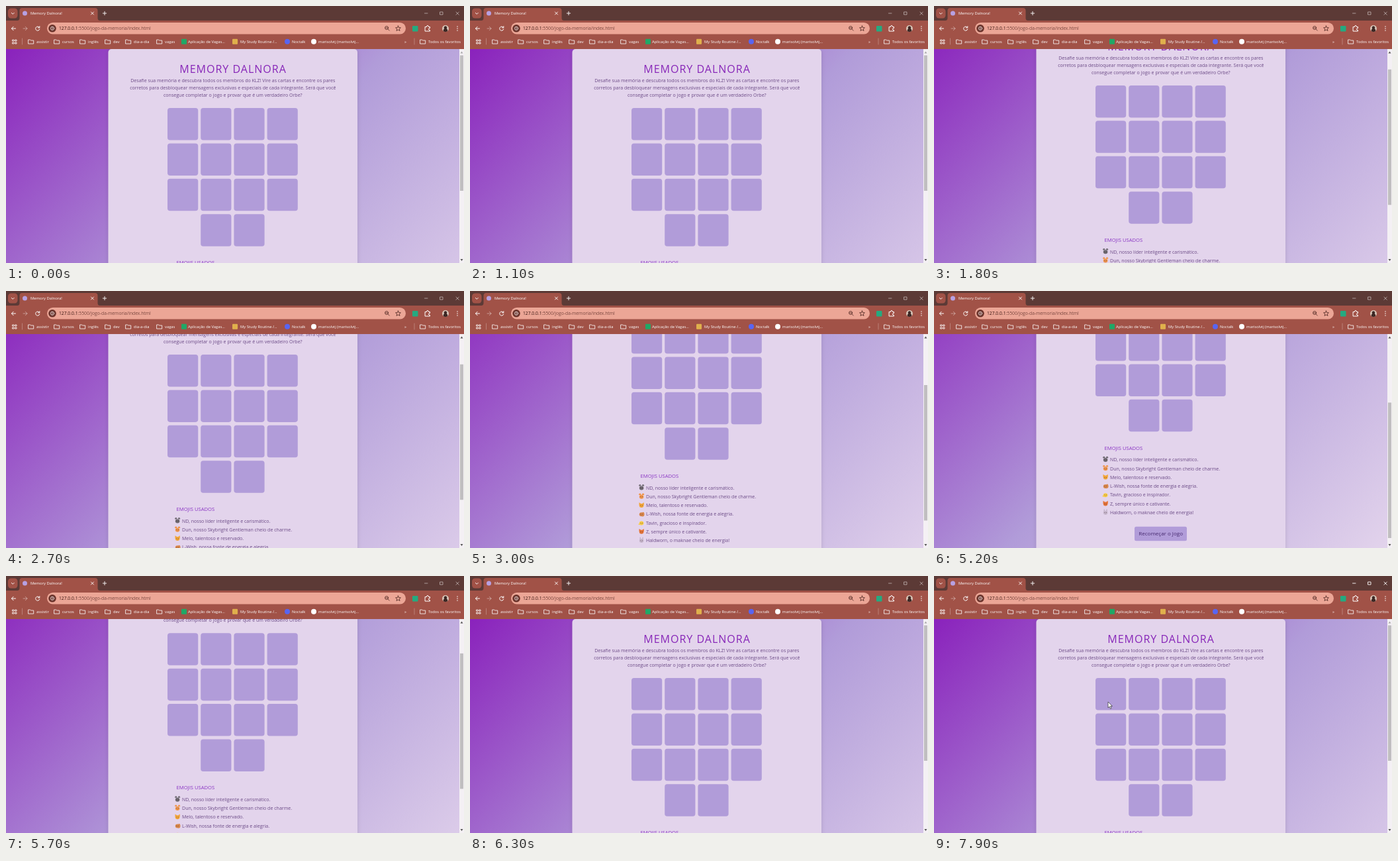
An HTML page that plays this animation: 692 px wide and 388 px high, repeating every 8000 ms.

```html
<!DOCTYPE html>
<html lang="pt-BR">
<head>
<meta charset="utf-8">
<title>Memory Dalnora!</title>
<style>
  html, body { margin: 0; width: 100%; height: 100%; overflow: hidden; }
  svg { display: block; width: 692px; height: 388px; font: 7.05px "Open Sans", "Noto Sans", sans-serif; }
  .mid { text-anchor: middle; }
  .copy { fill: #6b4a86; }
  .bar { font-size: 5.8px; fill: #fff; }
  .line { fill: none; stroke: #fff; stroke-linecap: round; stroke-linejoin: round; }
  .dark { stroke: #4a241f; }
</style>
</head>
<body>
<svg viewBox="0 0 692 388">
  <defs>
    <linearGradient id="sky" gradientUnits="userSpaceOnUse" x1="50.9" y1="-50.9" x2="634.1" y2="532.4">
      <stop offset="0" stop-color="#8a22bc"/>
      <stop offset=".5" stop-color="#b19cd9"/>
      <stop offset="1" stop-color="#e3d4ec"/>
    </linearGradient>
    <filter id="shadow" x="-5%" width="110%"><feDropShadow dx="0" dy="1" stdDeviation="3" flood-opacity=".13"/></filter>
  </defs>

  <g id="page">
    <rect width="692" height="482" fill="url(#sky)"/>
    <rect x="154.5" width="376.5" height="481.5" rx="5" fill="#e3d4ec" filter="url(#shadow)"/>
    <text class="mid" x="343" y="36.3" font-size="16" letter-spacing="1" fill="#8726b8">MEMORY DALNORA</text>
    <g class="mid copy">
      <text x="342.8" y="50.3">Desafie sua memória e descubra todos os membros do KLZ! Vire as cartas e encontre os pares</text>
      <text x="342.8" y="61">corretos para desbloquear mensagens exclusivas e especiais de cada integrante. Será que você</text>
      <text x="342.8" y="71.7">consegue completar o jogo e provar que é um verdadeiro Orbe?</text>
    </g>
    <g id="cards" fill="#b19cd9"></g>
    <text x="257.5" y="325.1" font-size="7.65" font-weight="500" fill="#8a35c4">EMOJIS USADOS</text>
    <g id="list" class="copy"></g>
    <rect x="303" y="441" width="79" height="21.5" rx="2.5" fill="#b19cd9"/>
    <text class="mid" x="342.7" y="454.6" font-size="8" fill="#472a70">Recomeçar o Jogo</text>
  </g>

  <rect x="685" y="65" width="7" height="323" fill="#f4f0f4"/>
  <rect id="thumb" x="686" y="74.5" width="5" height="204.5" fill="#c0bec0"/>
  <path id="up" d="M686.5 71.5l2-3 2 3z"/>
  <path id="down" d="M686.5 382l2 3 2-3z"/>

  <rect width="692" height="23" fill="#5c3a36"/>
  <rect y="22" width="692" height="43" fill="#a15247"/>
  <rect x="3" y="3.5" width="14.5" height="15" rx="4.5" fill="#a15247"/>
  <path d="M17 22q3.500 0 3.500-4V7q0-4 4-4h110q4 0 4 4v11q0 4 3.500 4z" fill="#a15247"/>
  <circle cx="28.500" cy="11" r="3.500" fill="#b7a0e2"/>
  <text x="37" y="13.300" font-size="5.900" fill="#fff">Memory Dalnora!</text>
  <path class="line" stroke-width=".9" d="M8.300 10.300l2 2 2-2M128.500 9l4 4m0-4l-4 4M146.300 11h5.400m-2.700-2.700v5.400"/>
  <path id="controls" class="line" stroke-width=".9" d="M632.500 11h4.500M656 9h4v4h-4zM680 9l4.300 4.300m0-4.300l-4.300 4.300"/>

  <path class="line" d="M14.500 34H8.500m2.700-2.800L8.500 34l2.700 2.800M50.300 32.200a3.100 3.100 0 1 0 .5 2.800m0-4.300v2.200h-2.300"/>
  <path class="line" opacity=".4" d="M26 34h6m-2.700-2.800L32 34l-2.700 2.800"/>
  <rect x="62" y="25" width="542" height="17.500" rx="8.750" fill="#eca696"/>
  <circle cx="70" cy="33.800" r="5.800" fill="#6b342c"/>
  <circle class="line" cx="70" cy="33.800" r="2.600" stroke-width=".7"/>
  <path class="line" stroke-width=".7" d="M70 33.500v1.600m0-2.800v.1"/>
  <text x="80" y="36.300" font-size="6.750" fill="#7b4840"><tspan fill="#35130f">127.0.0.1</tspan>:5500/jogo-da-memoria/index.html</text>
  <path class="line dark" stroke-width=".8" d="M577 34.800l2.300 2.300M573.700 33h2.800"/>
  <circle class="line dark" cx="575.100" cy="33" r="2.500" stroke-width=".8"/>
  <path class="line dark" stroke-width=".8" d="M592.500 30l1.100 2.600 2.800.2-2.100 1.800.7 2.800-2.500-1.500-2.500 1.500.7-2.800-2.100-1.800 2.800-.2z"/>
  <rect x="614" y="30" width="8.500" height="8.500" rx="1" fill="#25aa80"/>
  <path class="line" d="M633.500 31.500h2q0-2 1.500-2t1.500 2h2v2q-2 0-2 1.500t2 1.500v1.500h-7z"/>
  <circle cx="664" cy="34" r="5" fill="#d8c5b7"/>
  <path d="M660.700 37.700q0-3 1.500-3.500a2.300 2.300 0 1 1 3.600 0q1.500.5 1.500 3.500-3.300 2.600-6.600 0z" fill="#3c2724"/>
  <path class="line" stroke-width="1.500" d="M682 31v.01M682 34v.01M682 37v.01"/>

  <g id="bookmarks" class="bar"></g>
  <path class="line" stroke-width=".8" d="M10 51h2v2h-2zm4 0h2v2h-2zm-4 4h2v2h-2zm4 0h2v2h-2z"/>
  <path class="line" stroke-width=".6" opacity=".45" d="M24.500 49v9M617 49v9"/>
  <text class="bar" x="602" y="56" font-size="9">»</text>

  <path id="cursor" d="M263 190v9l2.100-1.900 1.500 3.300 1.500-.7-1.500-3.200h2.900z" fill="#fff" stroke="#333" stroke-width=".7"/>
</svg>

<script>
const $ = id => document.getElementById(id);
const fill = (id, parts) => { $(id).innerHTML = parts.join(""); };

// Three full rows of four cards, then two centred below.
fill("cards", Array.from({ length: 14 }, (_, i) => {
  const col = i < 12 ? i % 4 : i - 11, row = Math.floor(i / 4);
  return `<rect x="${244 + col * 50.2}" y="${89 + row * 53.4}" width="46.2" height="48.5" rx="3.8"/>`;
}));

const members = [
  ["#6f6a72", "ND, nosso líder inteligente e carismático."],
  ["#f0954c", "Dun, nosso Skybright Gentleman cheio de charme."],
  ["#f3a638", "Melo, talentoso e reservado."],
  ["#d9874a", "L-Wish, nossa fonte de energia e alegria."],
  ["#f8cc45", "Tavin, gracioso e inspirador."],
  ["#e67438", "Z, sempre único e cativante."],
  ["#c6b6cc", "Haldworn, o maknae cheio de energia!"]
];
const ears = {
  round: "M255.300 -5a1.700 1.700 0 1 1 3 0zM260 -5a1.700 1.700 0 1 1 3 0z",
  cat: "M255.500 -2.500v-4.500l3 2zM262.800 -2.500v-4.500l-3 2z",
  tail: "M260 1q5 0 3-6-3-2-3 2z",
  wing: "M255 -2l-.5 2 3 .6z",
  tall: "M256.500 -3v-4.500h1.500v4zM260.300 -3v-4.500h1.500v4z"
};
const looks = ["round", "round", "cat", "tail", "wing", "cat", "tall"];
fill("list", members.map(([color, text], i) => `
  <g transform="translate(0 ${342.6 + i * 13.28})">
    <path d="${ears[looks[i]]}" fill="${color}"/>
    <ellipse cx="259.1" cy="-2.2" rx="3.3" ry="3" fill="${color}"/>
    <path d="M257.900 -2.800v.8m2.500-.8v.8m-1.200 1v.3" stroke="#493038" stroke-width=".8"/>
    <text x="266">${text}</text>
  </g>`));

// Folders have no icon colour; other bookmarks get a plain dot or square.
const bookmarks = [
  [34, 46, "assistir"], [73, 85, "cursos"], [112, 124, "inglês"], [150, 162, "dev"],
  [181, 193, "dia-a-dia"], [228, 240, "vagas"],
  [265, 275, "Aplicação de Vagas...", "#20a866", 1], [342, 354, "My Study Routine /...", "#e0b04c", 1],
  [421, 432, "Noctalk", "#5865f2", 4], [461, 472, "marisolvtj (marisolvtj...", "#fff", 4],
  [626, 638, "Todos os favoritos"]
];
fill("bookmarks", bookmarks.map(([x, textX, label, color, radius]) =>
  (color
    ? `<rect x="${x}" y="49.800" width="8" height="8" rx="${radius}" fill="${color}"/>`
    : `<path class="line" stroke-width=".8" d="M${x} 51h2.700l1 1h4v5h-7.700z"/>`) +
  `<text x="${textX}" y="56">${label}</text>`));

// Wheel notches: start, duration, scroll reached.
const notches = [
  [1700, 170, 54], [2650, 300, 108], [3230, 170, 158.5],
  [5135, 265, 104.5], [5535, 265, 50.5], [5950, 300, 0]
];
const smooth = u => u * u * (3 - 2 * u);

function scrollAt(t) {
  let y = 0;
  for (const [start, duration, to] of notches) {
    const u = Math.min(1, Math.max(0, (t - start) / duration));
    y += (to - y) * smooth(u);
  }
  return y;
}

function draw() {
  const t = Math.floor(performance.now() % 8000 / 100) * 100;
  const y = scrollAt(t);
  const active = t >= 7900;
  $("page").setAttribute("transform", `translate(0 ${65 - y})`);
  $("thumb").setAttribute("y", 74.5 + y * 0.625);
  $("up").setAttribute("fill", y > 0.5 ? "#555" : "#aaa");
  $("down").setAttribute("fill", y < 158 ? "#555" : "#aaa");
  $("controls").setAttribute("opacity", active ? 1 : 0.55);
  $("cursor").setAttribute("visibility", active ? "visible" : "hidden");
  requestAnimationFrame(draw);
}
draw();
</script>
</body>
</html>
```
